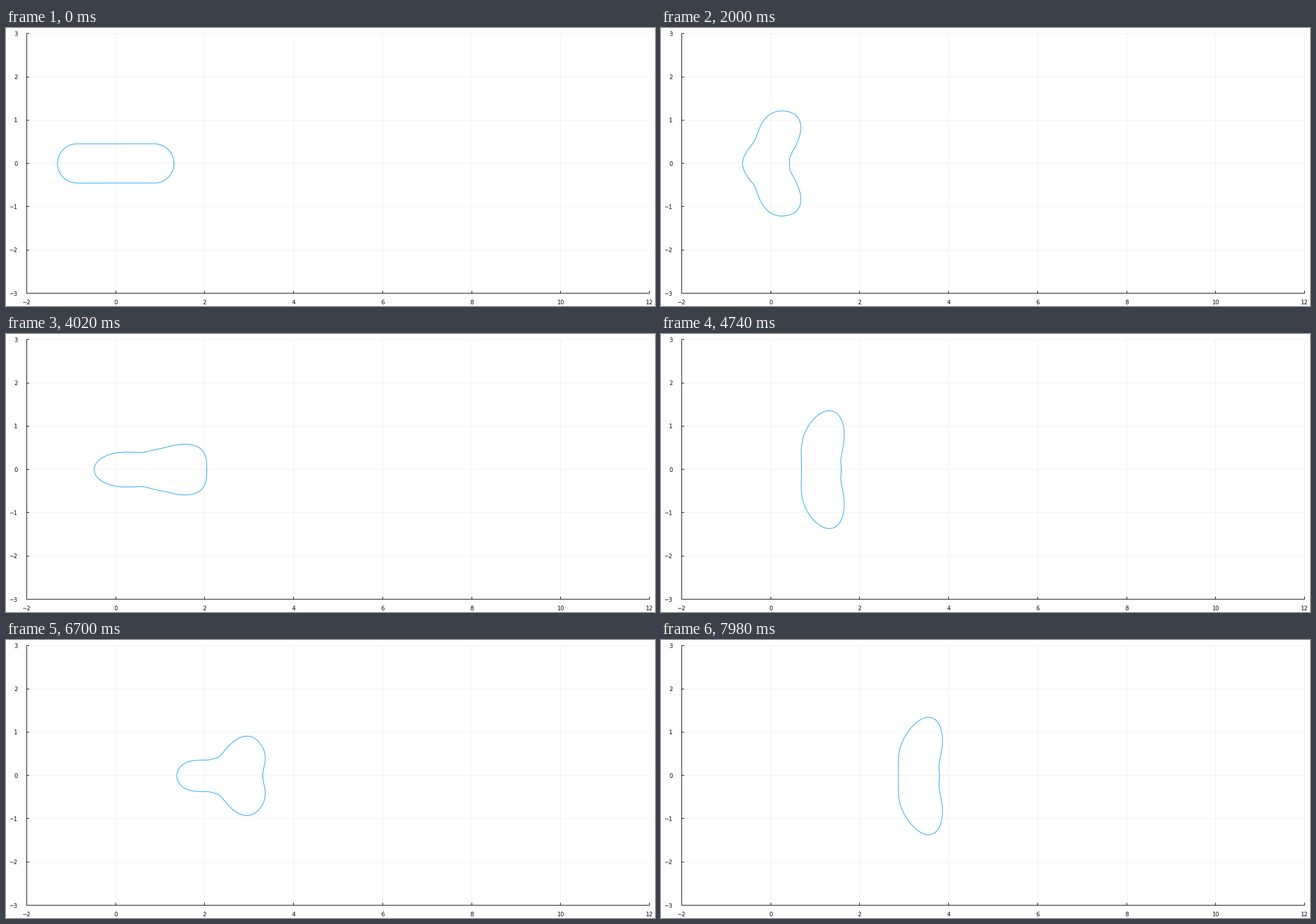
Animation, 1143 px wide and 490 px high, one loop 8000 ms. Source, as a matplotlib script:

```python
import numpy as np
import matplotlib.pyplot as plt
from matplotlib.animation import FuncAnimation

W, H, DPI = 1143, 490, 100
FRAMES, STEP = 400, 20
PX = 72 / DPI
LEFT, RIGHT, TOP, BOTTOM = 36.5, 1133.5, 9.7, 467.5
START_X, MID_Y = 193.3, 238.7
HALF_LENGTH, RADIUS = 68, 34.6
AREA = 4 * HALF_LENGTH * RADIUS + np.pi * RADIUS ** 2
THETA = np.linspace(0, 2 * np.pi, 721)


def hermite(q, knots, values):
    """Smooth curve through keyed values or rows of values."""
    m = np.gradient(values, knots, axis=0)
    i = int(np.clip(np.searchsorted(knots, q, side="right") - 1, 0, len(knots) - 2))
    h = knots[i + 1] - knots[i]
    u = (q - knots[i]) / h
    return ((1 + 2 * u) * (1 - u) ** 2 * values[i] + u * (1 - u) ** 2 * h * m[i]
            + u * u * (3 - 2 * u) * values[i + 1] + u * u * (u - 1) * h * m[i + 1])


def pose(*radii, shift=0):
    """Origin shift, then log radii: a cosine series through radii evenly spread over 180 degrees."""
    k = np.arange(len(radii))
    angles = k * np.pi / k[-1]
    weights = np.linalg.solve(np.cos(np.outer(angles, k)), np.log(radii))
    return np.append(shift, np.cos(np.outer(THETA, k)) @ weights)


def capsule():
    c, s = abs(np.cos(THETA)), abs(np.sin(THETA))
    flat = RADIUS / np.maximum(s, 1e-9)
    cap = HALF_LENGTH * c + np.sqrt(np.maximum(RADIUS ** 2 - (HALF_LENGTH * s) ** 2, 0))
    return np.append(0, np.log(np.where(flat * c <= HALF_LENGTH, flat, cap)))


pill = capsule()
trefoil = pose(73.9, 86.8, 87.7, 58, 38.7, 33.9, 40, 67.1, 85.3)
clover = pose(72.8, 83.7, 89.3, 70.7, 38.8, 33.4, 39.7, 64.9, 80)
bean = pose(31.8, 33.6, 47.4, 89.3, 98.7, 74, 54.7, 43, 39.6)
upright = pose(29.9, 32, 41.6, 67.6, 98.7, 95.3, 59.3, 47.3, 44.3)
pear = pose(92.5, 90.3, 61.8, 40.8, 34.4, 33.7, 42.3, 74.7, 104.5)
chevron = pose(36.5, 42.8, 79.2, 98.3, 85.5, 55, 44.5, 44.9, 46.5, shift=-20)

# Strokes done by a given time, and the poses passed within one stroke.
TIMES = np.array([0, 2.0, 3.14, 4.02, 5.46, 6.7, 7.98])
STROKES = np.array([0, 0.41, 1.53, 2.87, 6.19, 9.24, 12.41])
PHASES = np.array([-0.13, 0, 0.19, 0.24, 0.41, 0.53, 0.87, 1, 1.19])


def body(t):
    phase = hermite(t, TIMES, STROKES) % 1
    settled = np.clip(t - 2, 0, 1)
    bent = chevron + (bean - chevron) * settled
    cycle = np.array([pear, pill, trefoil, clover, bent, upright, pear, pill, trefoil])
    state = hermite(phase, PHASES, cycle)
    r = np.exp(state[1:])
    # The area stays constant while the shape changes.
    r *= np.sqrt(AREA / (np.mean(r[:-1] ** 2) * np.pi))
    x = START_X + 4.16 * t * t + state[0] + r * np.cos(THETA)
    y = MID_Y + 0.016 * t * t - r * np.sin(THETA)
    return x, y


fig = plt.figure(figsize=(W / DPI, H / DPI), dpi=DPI, facecolor="white")
ax = fig.add_axes([0, 0, 1, 1])
ax.set_xlim(0, W)
ax.set_ylim(H, 0)
ax.axis("off")


def rule(xs, ys, color, z):
    ax.plot(xs, ys, color=color, lw=PX, zorder=z, solid_capstyle="butt", snap=False)


def label(x, y, value, align):
    ax.text(x, y, str(value).replace("-", "\u2212"), ha=align, va="center_baseline",
            family="DejaVu Sans", fontsize=10 * PX, color="black")


def pixel(v):
    return np.floor(v) + 0.5


for value in range(-2, 13, 2):
    x = LEFT + (value + 2) * (RIGHT - LEFT) / 14
    rule([pixel(x)] * 2, [TOP, BOTTOM], "#f0f0f0", 1)
    rule([pixel(x)] * 2, [BOTTOM, BOTTOM - 4.5], "black", 3)
    label(x, 482.5, value, "center")
for value in range(-3, 4):
    y = BOTTOM - (value + 3) * (BOTTOM - TOP) / 6
    rule([LEFT, RIGHT], [pixel(y)] * 2, "#f0f0f0", 1)
    rule([LEFT, LEFT + 4.5], [pixel(y)] * 2, "black", 3)
    label(20.5, y, value, "right")
rule([LEFT, LEFT], [TOP, BOTTOM + 0.5], "black", 3)
rule([LEFT, RIGHT], [BOTTOM, BOTTOM], "black", 3)

curve, = ax.plot([], [], color="#009afa", lw=0.95 * PX, zorder=4,
                 solid_joinstyle="round", snap=False)


def draw(i):
    curve.set_data(*body(i * STEP / 1000))
    return curve,


anim = FuncAnimation(fig, draw, frames=FRAMES, interval=STEP, repeat=True,
                     repeat_delay=0, blit=True)
plt.show()
```
